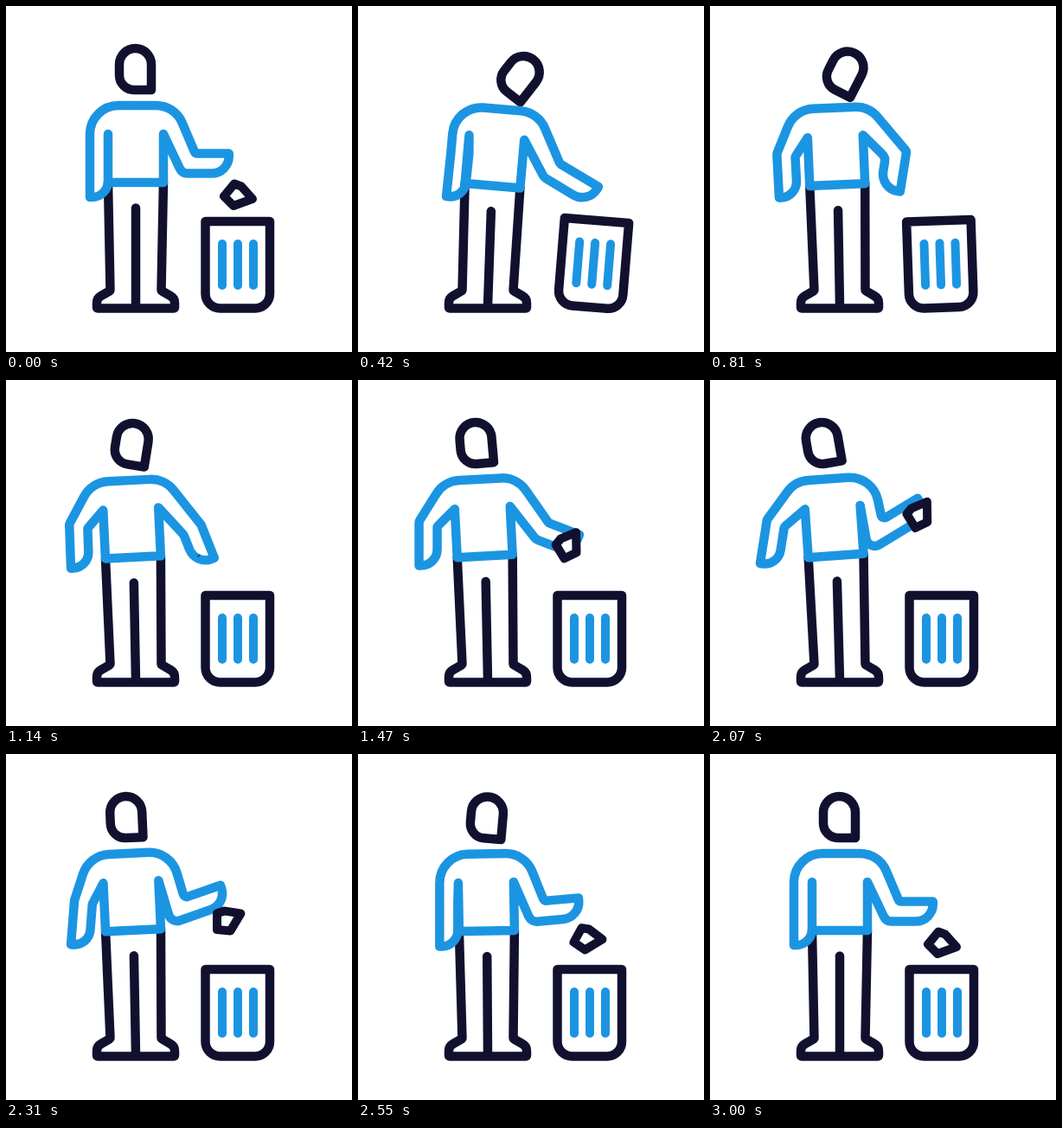
Write an HTML page with a canvas that moves like this. It is 400 by 400 pixels and loops after 3090 ms.

```html
<!DOCTYPE html>
<html lang="en">
<head>
<meta charset="utf-8">
<title>Throwing paper into a bin</title>
<style>
  html, body { margin: 0; width: 100%; height: 100%; overflow: hidden; background: #fff; }
  canvas { display: block; width: 100vw; height: 100vh; }
</style>
</head>
<body>
<canvas id="stage" width="400" height="400"></canvas>
<script>
const ctx = document.getElementById('stage').getContext('2d');
const NAVY = '#11112f', BLUE = '#1b95e2';
const LOOP = 3090, STEP = 30, END = 3000;
const DROP = 240, HIT = 150, GRAB = 1110, THROW = 2160;

// Angles in degrees: lean, head tilt, left upper arm and forearm,
// right upper arm and forearm; then the right forearm's length.
const REST = [0, 0, 0, 0, 23, 90, 39];
const poses = [
  [0, REST],
  [420, [5, 38, 5, 6, 23, 59, 52]],      // reach after the paper
  [810, [-2.5, 27, 22, -3, 40, -9, 47]], // arms hang
  [1470, [-3, -5, 32, 0, 35, 69, 38]],   // lift a new ball
  [2070, [-4, -10, 36, 9, 12, 121, 48]], // wind up
  [2550, [-1, 5, 0, 0, 22, 95, 40]],
  [END, REST]
];

const rad = deg => deg * Math.PI / 180;
const clamp = u => Math.max(0, Math.min(1, u));
const smooth = u => u * u * (3 - 2 * u);
const add = ([x, y], [u, v], k = 1) => [x + u * k, y + v * k];
const turn = ([x, y], deg) => {
  const c = Math.cos(rad(deg)), s = Math.sin(rad(deg));
  return [x * c - y * s, x * s + y * c];
};

// Smooth interpolation that never overshoots its keys.
function slope(keys, i, c) {
  if (i < 1 || i > keys.length - 2) return 0;
  const rate = j => (keys[j + 1][1][c] - keys[j][1][c]) / (keys[j + 1][0] - keys[j][0]);
  const a = rate(i - 1), b = rate(i);
  return a * b <= 0 ? 0 : 2 * a * b / (a + b);
}

function sample(keys, t) {
  let i = 0;
  while (i < keys.length - 2 && t >= keys[i + 1][0]) i++;
  const [t0, a] = keys[i], [t1, b] = keys[i + 1];
  const d = t1 - t0, u = (t - t0) / d;
  return a.map((v, c) => v + (b[c] - v) * smooth(u)
    + d * u * (1 - u) * ((1 - u) * slope(keys, i, c) - u * slope(keys, i + 1, c)));
}

// A sleeve of even width, mitred at the elbow; side is -1 for left, 1 for right.
function arm(side, joint, upper, fore, length, foreLength, width) {
  const dir = a => [side * Math.sin(rad(a)), Math.cos(rad(a))];
  const f = dir(fore), inward = [-side * f[1], side * f[0]];
  const miter = width * Math.tan(rad(fore - upper) / 2);
  const elbow = add(joint, dir(upper), length - Math.max(0, miter) / 2);
  const hand = add(elbow, f, foreLength);
  return {
    f, inward, elbow, hand,
    palm: add(hand, inward, width),
    inner: add(add(elbow, inward, width), f, -miter)
  };
}

function buildBody([lean, tilt, lUpper, lFore, rUpper, rFore, reach]) {
  const hip = [150 + 1.1 * lean, 204 + .1 * tilt];
  const torso = (x, y) => add(hip, turn([x, y], lean));
  // Shoulders draw in as an arm swings outward.
  const shoulder = (side, a) => torso(side * (53 - 20 * Math.sin(rad(a))), -89);
  const sl = shoulder(-1, lUpper), sr = shoulder(1, rUpper);
  return {
    hip, tilt, sl, sr,
    head: add(hip, turn([-.5, -131], lean + tilt / 4)),
    waist: [torso(-32, 0), torso(32, 0)],
    pits: [torso(-32, -56), torso(32, -56)],
    left: arm(-1, sl, lUpper, lFore, 55, 51, 21),
    right: arm(1, sr, rUpper, rFore, 68, reach, 23)
  };
}

function pen(color, width) {
  ctx.strokeStyle = color;
  ctx.lineWidth = width;
  ctx.lineCap = ctx.lineJoin = 'round';
}

function line(a, b) {
  ctx.beginPath();
  ctx.moveTo(...a);
  ctx.lineTo(...b);
  ctx.stroke();
}

// Polyline of [point, radius] corners; radii shrink where the sides are short.
function trace(corners, closed) {
  const n = corners.length;
  ctx.beginPath();
  corners.forEach(([[x, y], r = 0], i) => {
    const [px, py] = corners[(i + n - 1) % n][0], [nx, ny] = corners[(i + 1) % n][0];
    const l1 = Math.hypot(px - x, py - y), l2 = Math.hypot(nx - x, ny - y);
    const cos = ((x - px) * (nx - x) + (y - py) * (ny - y)) / (l1 * l2);
    const half = Math.tan(Math.acos(Math.max(-1, Math.min(1, cos))) / 2);
    const cut = Math.min(r * half, .88 * l1, .88 * l2);
    if (cut < .05) ctx.lineTo(x, y);
    else ctx.arcTo(x, y, nx, ny, cut / half);
  });
  if (closed) ctx.closePath();
}

function place([x, y], deg, scale = 1) {
  ctx.translate(x, y);
  ctx.rotate(rad(deg));
  ctx.scale(scale, scale);
}

function drawLegs({ hip, waist }) {
  const foot = side => [
    [[150 + 29.5 * side, 329], 2], [[150 + 45 * side, 338], 9], [[150 + 45 * side, 349.5], 1]
  ];
  pen(NAVY, 10.5);
  trace([[waist[0]], ...foot(-1), ...foot(1).reverse(), [waist[1]]]);
  ctx.stroke();
  line([150 + (hip[0] - 150) * .7, hip[1] + 29.5], [150, 347]);
}

function drawHead({ head, tilt }) {
  ctx.save();
  place(head, tilt);
  pen(NAVY, 10.5);
  trace([[[18.5, 24]], [[-18.5, 24], 17], [[-18.5, -24], 18.5], [[18.5, -24], 18.5]], true);
  ctx.stroke();
  ctx.restore();
}

function drawShirt({ waist, pits, sl, sr, left, right }) {
  pen(BLUE, 10.5);
  trace([
    [waist[0]], [pits[0]], [left.inner, 3], [left.palm, 20], [left.hand], [left.elbow, 6], [sl, 33],
    [sr, 33], [right.elbow, 4], [right.hand], [right.palm, 20], [right.inner, 10], [pits[1]], [waist[1]]
  ], true);
  ctx.stroke();
}

function drawPaper(t, { f, inward, hand }) {
  if (t > DROP && t <= GRAB) return;
  const fall = t <= DROP ? (t / DROP) ** 2 : 0;
  const flight = t <= DROP ? 1 : 1 - (1 - clamp((t - THROW) / (END - THROW))) ** 3;
  const grow = t <= DROP ? 1 : smooth(clamp((t - GRAB) / 180));
  const held = add(add(hand, f, -9), inward, 16);
  const x = held[0] + (268 - held[0]) * flight;
  const y = held[1] + (218 - held[1]) * flight + 75 * fall;

  ctx.save();
  if (fall) {
    ctx.beginPath();
    ctx.rect(0, 0, 400, 249);
    ctx.clip();
  }
  place([x, y], -71 * (1 - flight) + 25 * fall, grow);
  pen(NAVY, 10);
  trace([[[-4, -12.5]], [[4, -9.5]], [[17, 5]], [[-5, 13]], [[-16, 2]]], true);
  ctx.fillStyle = '#fff';
  ctx.fill();
  ctx.stroke();
  ctx.restore();
}

// The hit rocks the bin once each way, about one bottom corner then the other.
function binAngle(t) {
  const u = t - HIT, half = 460;
  return u < 0 || u > 2 * half ? 0 : 9 * Math.exp(-.0023 * u) * Math.sin(Math.PI * u / half);
}

function drawBin(deg) {
  const pivot = deg > 0 ? 285 : 245;
  ctx.save();
  place([pivot, 350], deg);
  ctx.translate(-pivot, -350);
  pen(NAVY, 10.5);
  trace([[[230.5, 249]], [[305, 249]], [[305, 349.5], 17], [[230.5, 349.5], 17]], true);
  ctx.stroke();
  pen(BLUE, 10);
  for (let x = 250; x <= 286; x += 18) line([x, 275], [x, 323]);
  ctx.restore();
}

function draw(t) {
  const body = buildBody(sample(poses, t));
  ctx.fillStyle = '#fff';
  ctx.fillRect(0, 0, 400, 400);
  drawLegs(body);
  drawHead(body);
  drawShirt(body);
  drawPaper(t, body.right);
  drawBin(binAngle(t));
}

const start = performance.now();
function tick() {
  const t = (performance.now() - start) % LOOP;
  draw(Math.min(END, Math.floor(t / STEP) * STEP));
  requestAnimationFrame(tick);
}
tick();
</script>
</body>
</html>
```
